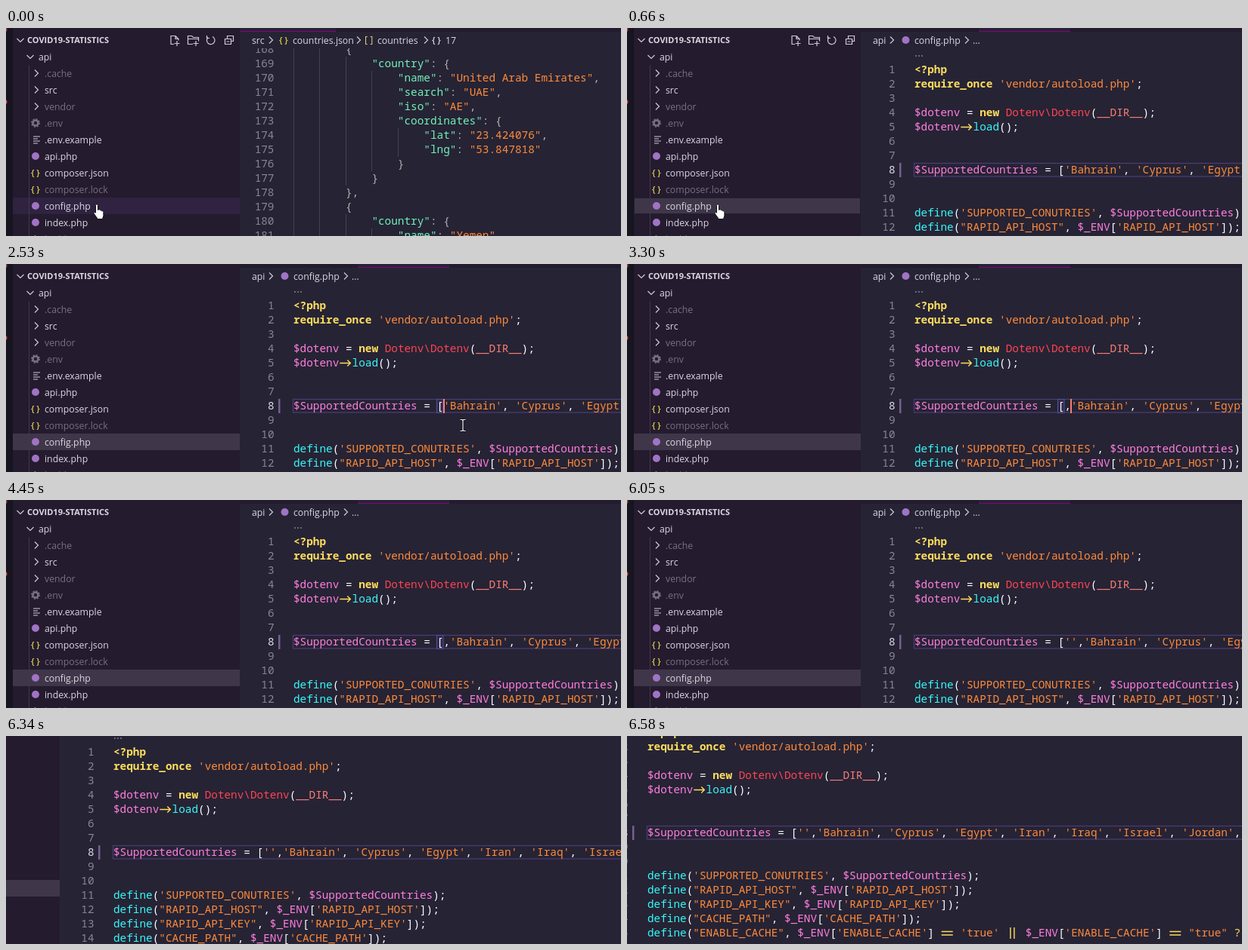
Animation, 813 px wide and 276 px high, one loop 8000 ms. Source, as an HTML page:

```html
<!DOCTYPE html>
<html>
<head>
<meta charset="utf-8">
<style>
html, body { margin: 0; width: 100%; height: 100%; overflow: hidden; background: #262335; }
svg { display: block; width: 813px; height: 276px; }
text { white-space: pre; font: 12.3px "Open Sans", sans-serif; fill: #dcd8e2; }
.code { font: 500 14.36px "Noto Sans Mono", monospace; fill: #fff; }
.json { fill: #b6b1b1; }
.num { font-weight: 400; fill: #888691; text-anchor: end; }
.title { font-weight: 700; font-size: 11px; }
.dim { fill: #78717f; }
.line { fill: none; stroke: #cfcad6; stroke-width: 1.2; }
</style>
</head>
<body>
<svg viewBox="0 0 813 276"><g id="world"></g></svg>
<script>
const LOOP = 8000, CHAR = 8.616, CODE_X = 380, ROW = 19;
const SYNTAX = [
  [/"\w+"(?=:)/, '#72f1b8'],
  [/'[^']*'|"[^"]*"/, '#ff8b39'],
  [/<\?php|require_once|new/, '#fede5d', 600],
  [/->|==|\|\||\?/, '#fede5d'],
  [/\$\w+/, '#ff7edb'],
  [/Dotenv\\Dotenv/, '#fe4450'],
  [/__DIR__/, '#f97e72'],
  [/define|load/, '#36f9f6'],
];
const tokenizer = new RegExp(SYNTAX.map(([re]) => `(${re.source})`).join('|'), 'g');
// Operators drawn as one joined shape, relative to the row's centre
const LIGATURES = {
  '->': 'm1 .5h14m-4 -4l4 4 -4 4',
  '==': 'm1 -1.5h15m0 4.5h-15',
  '||': 'm6 -7v15m5 -15v15',
};

const world = document.getElementById('world');

function add(parent, tag, attrs = {}, content) {
  const node = document.createElementNS('http://www.w3.org/2000/svg', tag);
  for (const name in attrs) node.setAttribute(name, attrs[name]);
  if (content !== undefined) node.textContent = content;
  return parent.appendChild(node);
}
const group = parent => add(parent, 'g');
const rect = (parent, x, y, width, height, fill) => add(parent, 'rect', { x, y, width, height, fill });
const label = (parent, x, y, content, cls = '') => add(parent, 'text', { x, y: y + 4.5, class: cls }, content);
const path = (parent, d, attrs = {}) => add(parent, 'path', { d, class: 'line', ...attrs });
const colored = (node, color) => { node.style.fill = color; return node; };
const disc = (parent, x, y, r, fill) => add(parent, 'circle', { cx: x, cy: y, r, fill });
const chevron = (parent, x, y, open) =>
  path(parent, open ? `M${x - 4.5} ${y - 2}l4.5 4.5 4.5 -4.5` : `M${x - 2} ${y - 4.5}l4.5 4.5 -4.5 4.5`);
const braces = (parent, x, y, color = '#d9cc4c') =>
  colored(add(parent, 'text', { x, y: y + 4, style: 'font-weight:600' }, '{ }'), color).style.fontSize = '11.5px';

// Writes one syntax-coloured row.
function code(parent, column, y, source, cls = '') {
  const x = CODE_X + column * CHAR;
  const row = add(parent, 'text', { x, y: y + 5, class: 'code ' + cls });
  let end = 0;
  for (const match of source.matchAll(tokenizer)) {
    const [, color, weight = 500] = SYNTAX[match.slice(1).findIndex(Boolean)];
    const token = match[0], joined = LIGATURES[token];
    add(row, 'tspan', {}, source.slice(end, match.index));
    add(row, 'tspan', { style: `fill:${color};font-weight:${weight}` }, joined ? '  ' : token);
    end = match.index + token.length;
    if (joined) path(parent, `M${x + match.index * CHAR} ${y}${joined}`, { style: `stroke:${color};stroke-width:1.4` });
  }
  add(row, 'tspan', {}, source.slice(end));
}
const lineNumber = (parent, y, n, active) => {
  const node = add(parent, 'text', { x: 354.5, y: y + 5, class: 'code num' }, n);
  if (active) node.style.fill = '#e0dfe4';
};

// JSON editor
const json = group(world);
const jsonRows = [
  [8, '{'], [12, '"country": {'], [16, '"name": "United Arab Emirates",'],
  [16, '"search": "UAE",'], [16, '"iso": "AE",'], [16, '"coordinates": {'],
  [20, '"lat": "23.424076",'], [20, '"lng": "53.847818"'], [16, '}'], [12, '}'],
  [8, '},'], [8, '{'], [12, '"country": {'], [16, '"name": "Yemen",'],
];
jsonRows.forEach(([indent, source], i) => {
  const y = 28 + i * ROW;
  for (let c = 0; c < indent; c += 4) rect(json, Math.round(CODE_X + c * CHAR), y - 9, 1, ROW, '#444251');
  lineNumber(json, y, 168 + i);
  code(json, indent, y, source, 'json');
});
rect(json, 309, 0, 504, 27, '#262335');
rect(json, 436, 0, 377, 5, '#241b2f');
rect(json, 309, 4, 127, 1, '#880088');
label(json, 325, 16, 'src');
chevron(json, 350, 16);
braces(json, 361, 16);
label(json, 379, 16, 'countries.json');
chevron(json, 466, 16);
colored(label(json, 474, 15.5, '[ ]'), '#e6d873');
label(json, 491, 16, 'countries');
chevron(json, 555, 16);
braces(json, 563, 16, '#dcd8e2');
label(json, 581, 16, '17');

// PHP editor
const php = group(world);
const phpRows = {
  1: '<?php',
  2: "require_once 'vendor/autoload.php';",
  4: '$dotenv = new Dotenv\\Dotenv(__DIR__);',
  5: '$dotenv->load();',
  8: '$SupportedCountries = [',
  11: "define('SUPPORTED_CONUTRIES', $SupportedCountries);",
  12: `define("RAPID_API_HOST", $_ENV['RAPID_API_HOST']);`,
  13: `define("RAPID_API_KEY", $_ENV['RAPID_API_KEY']);`,
  14: `define("CACHE_PATH", $_ENV['CACHE_PATH']);`,
  15: `define("ENABLE_CACHE", $_ENV['ENABLE_CACHE'] == 'true' || $_ENV['ENABLE_CACHE'] == "true" ? true : false);`,
};
rect(php, 309, 0, 156, 5, '#241b2f');
rect(php, 586, 0, 600, 5, '#241b2f');
rect(php, 465, 4, 121, 1, '#880088');
label(php, 325, 16, 'api');
chevron(php, 350, 16);
disc(php, 368.5, 16, 5, '#a074c4');
label(php, 380, 16, 'config.php');
chevron(php, 449, 16);
label(php, 457, 16, '...');
for (let i = 0; i < 3; i++) disc(php, 382 + i * 4, 37, .9, '#8d8a97');
add(php, 'rect', { x: 379.5, y: 179.5, width: 840, height: 17.5, fill: 'none', stroke: '#4a3b70', 'stroke-width': 1.3 });
rect(php, 360, 179, 2.5, ROW, '#75608f');
const bracketBox = add(php, 'rect', { x: 569.5, y: 179.5, width: 8.5, height: 18, fill: '#34294f', stroke: '#495495' });
for (let n = 1; n <= 16; n++) {
  const y = 55 + (n - 1) * ROW;
  lineNumber(php, y, n, n === 8);
  if (phpRows[n]) code(php, 0, y, phpRows[n]);
}
const typed = colored(add(php, 'text', { x: CODE_X + 23 * CHAR, y: 193, class: 'code' }), '#ff8b39');
const comma = group(php), tail = group(php);
code(comma, 23, 188, ',');
code(tail, 23, 188, "'Bahrain', 'Cyprus', 'Egypt', 'Iran', 'Iraq', 'Israel', 'Jordan', 'Kuwait', 'Lebanon'];");
const caret = rect(php, 0, 179, 2, ROW, '#f97e72');

// Sidebar
const side = group(world);
rect(side, 0, 0, 9, 340, '#171520');
rect(side, 9, 0, 300, 340, '#241b2f');
disc(side, -2, 98, 3.5, '#e0503f');
disc(side, -2, 2, 3.5, '#b0443f');
const rowFill = rect(side, 9, 225, 300, 22, '#2f2341');
const focusRing = add(side, 'rect', { x: 9.5, y: 225.5, width: 299, height: 21, fill: 'none', stroke: '#1f212b' });
rect(side, 30, 49, 1, 290, '#403849');
chevron(side, 19, 16, true);
label(side, 28, 15.5, 'COVID19-STATISTICS', 'title');
const actions = group(side);
path(actions, 'M222 21.5h-4v-11h6l4 4v2M224 10.5v4h4M226 17v7m-3.5 -3.5h7');
path(actions, 'M247 21.5h-6.5v-11h5l2 2h7v5M240.5 14.5h14M251 17v7m-3.5 -3.5h7');
path(actions, 'M267 12.5a5.3 5.3 0 1 0 6 -1M265.5 10v3.5h3.5');
path(actions, 'M289.5 14.5h8v7h-8zM292.5 14v-3.5h8v7h-2.5M291.5 18h4');

chevron(side, 32, 38, true);
label(side, 43, 38, 'api');
const icons = {
  folder: y => chevron(side, 40, y),
  gear: y => {
    disc(side, 39, y, 3.5, 'none').setAttribute('style', 'stroke:#78717f;stroke-width:2.6');
    add(side, 'circle', { cx: 39, cy: y, r: 5.2, fill: 'none', stroke: '#78717f', 'stroke-width': 1.6, 'stroke-dasharray': '2 2.08' });
  },
  lines: y => path(side, `M36 ${y - 4}h9m-9 3h6m-6 3h9m-9 3h6`),
  php: y => disc(side, 39, y, 5, '#a074c4'),
  json: y => braces(side, 33, y),
};
[
  ['folder', '.cache', 'dim'], ['folder', 'src'], ['folder', 'vendor', 'dim'],
  ['gear', '.env', 'dim'], ['lines', '.env.example'], ['php', 'api.php'],
  ['json', 'composer.json'], ['json', 'composer.lock', 'dim'],
  ['php', 'config.php'], ['php', 'index.php'], ['folder', 'build', 'dim'],
].forEach(([icon, name, cls], i) => {
  const y = 60 + i * 22;
  icons[icon](y);
  label(side, 51, y, name, cls);
});

// Pointers, both with their hot spot at 0,0
const hand = path(world,
  'M-1.5 1.5c0 -2 3 -2 3 0v6l1 -.5c1 -.6 2 0 2 1c1 -.6 2 0 2.2 1c1 -.5 2.2 .2 2.2 1.5v4c0 2 -1 3 -1.5 5h-6.5c-.5 -2 -2.5 -4 -4.5 -7c-1 -1.7 .8 -2.6 2.1 -1.3z',
  { style: 'fill:#fff;stroke:#111;stroke-width:1' });
const beam = group(world);
for (const [color, width] of [['#17141f', 3], ['#f4f4f4', 1.2]])
  path(beam, 'M-3.5 -7.5h2.5l1 1 1 -1h2.5M0 -6.5v13M-3.5 7.5h2.5l1 -1 1 1h2.5', { style: `stroke:${color};stroke-width:${width}` });

// Timelines: [start, ...values], held until the next entry
const POINTER = [
  [0, 120, 234], [940, 190, 190], [1060, 335, 105], [1180, 460, 48], [1300, 545, 95],
  [1420, 574, 190], [1670, 574, 193], [1790, 576, 194], [1910, 579, 196], [2030, 583, 198],
  [2530, 604, 214], [2650, -99, -99],
];
const CARET = [
  [0, 0], [2280, 23], [2790, 0], [3300, 24], [3820, 0], [3940, 23], [4450, 0], [4840, 24], [5480, 0],
];
const TYPED = [[0, '', 0], [3300, '', 1], [4840, "'", 1], [4960, "''", 1]];
const CAMERA = [[0, 0, 0], [6190, 100, 12], [6340, 238, 34], [6460, 325, 52], [6580, 353, 60]];

const at = (timeline, t) => timeline.findLast(entry => entry[0] <= t).slice(1);
const move = (node, x, y) => node.setAttribute('transform', `translate(${x} ${y})`);
const show = (node, visible) => { node.style.display = visible ? '' : 'none'; };

function draw(now) {
  const t = now % LOOP;
  const opened = t >= 660, editing = t >= 2280;
  show(json, !opened);
  show(php, opened);
  show(actions, !editing);
  show(focusRing, opened && !editing);
  show(bracketBox, editing && t < 6050);
  rowFill.setAttribute('fill', opened ? '#3f3749' : '#2f2341');

  const [quotes, commas] = at(TYPED, t);
  typed.textContent = quotes;
  show(comma, commas);
  move(comma, quotes.length * CHAR, 0);
  move(tail, (quotes.length + commas) * CHAR, 0);

  const [column] = at(CARET, t);
  show(caret, column);
  caret.setAttribute('x', Math.floor(CODE_X + column * CHAR));

  const [x, y] = at(POINTER, t);
  show(hand, x < 309);
  show(beam, x >= 309);
  move(x < 309 ? hand : beam, x, y);

  const [panX, panY] = at(CAMERA, t);
  move(world, -panX, -panY);
  requestAnimationFrame(draw);
}
requestAnimationFrame(draw);
</script>
</body>
</html>
```
